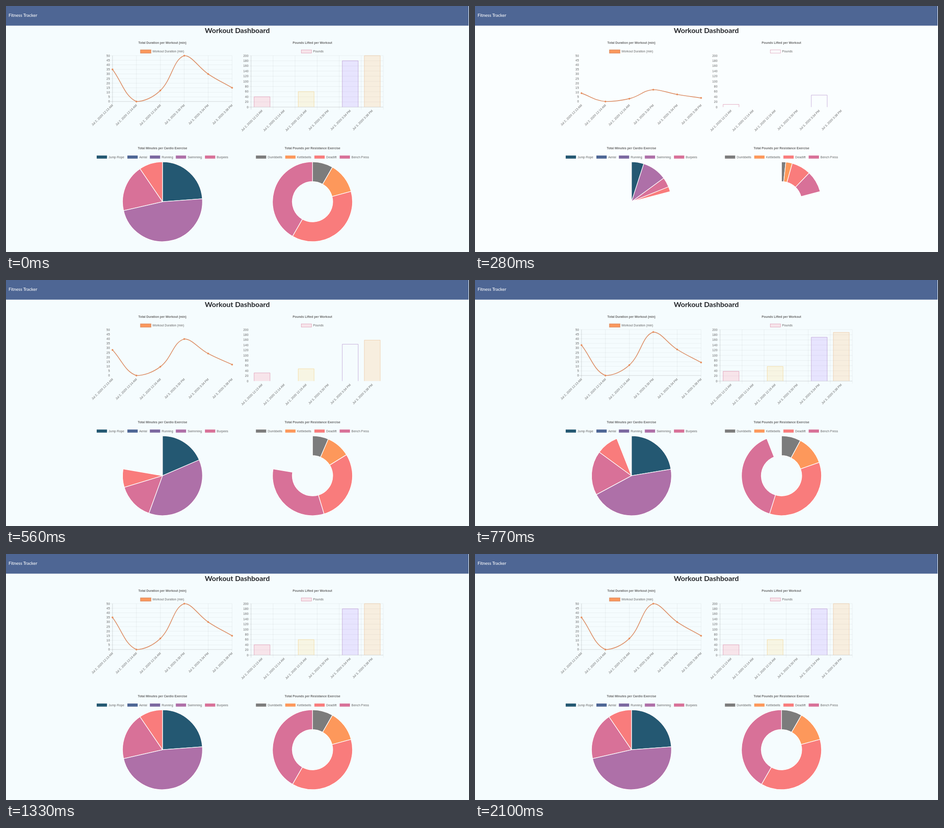
Recreate the animation shown at these times as an HTML page. Size 1026x546 px, loop 2310 ms.

```html
<!DOCTYPE html>
<html lang="en">
<head>
<meta charset="utf-8">
<title>Workout Dashboard</title>
<style>
html, body { margin: 0; width: 100%; height: 100%; overflow: hidden; background: #f5fcfe; }
svg { display: block; width: 1026px; height: 546px; }
text { font: 6.84px "Liberation Sans", Arial, sans-serif; fill: #666; }
.title { font-weight: bold; text-anchor: middle; }
.end { text-anchor: end; }
.brand { font: 500 9.7px Lato, sans-serif; fill: #fff; }
.heading { font: bold 15.96px Lato, sans-serif; fill: #24262a; text-anchor: middle; }
.grid { stroke: #000; stroke-opacity: .1; stroke-width: .57; }
.grid .axis { stroke-opacity: .27; }
.slice { stroke: #fff; stroke-width: 1.3; stroke-linejoin: bevel; }
</style>
</head>
<body>
<svg id="stage" viewBox="0 0 1026 546">
  <rect id="page" width="1026" height="546" fill="#f5fcfe"/>
  <rect width="1025" height="43.6" fill="#4e6694"/>
  <text class="brand" x="5.7" y="23.7">Fitness Tracker</text>
  <text class="heading" x="512.5" y="59.6">Workout Dashboard</text>
  <g id="charts"></g>
</svg>
<script>
const LOOP = 2310, STEP = 70;
const BLANK_FROM = 70, CHARTS_FROM = 280, TINTS_FROM = 560, GRID_FROM = 630;
const ORANGE = '#fd985b', PINK = '#d87198', CORAL = '#f97c7c';
const DATES = ['Jul 2, 2020 12:13 AM', 'Jul 2, 2020 12:14 AM', 'Jul 2, 2020 12:16 AM',
               'Jul 3, 2020 3:30 PM', 'Jul 3, 2020 3:34 PM', 'Jul 3, 2020 3:38 PM'];
const page = document.getElementById('page');
const charts = document.getElementById('charts');

function add(parent, tag, attrs = {}, content = '') {
  const node = document.createElementNS('http://www.w3.org/2000/svg', tag);
  for (const key in attrs) node.setAttribute(key, attrs[key]);
  node.textContent = content;
  parent.append(node);
  return node;
}

const label = (x, y, content, attrs = {}) =>
  add(charts, 'text', { x, y: y + 2.4, ...attrs }, content);

function legend(x, y, name, fill, stroke = 'none', width = 0) {
  label(x + 26.2, y, name);
  return add(charts, 'rect', { x, y: y - 3.42, width: 22.8, height: 6.84, fill, stroke, 'stroke-width': width });
}

function axes({ left, right, top, bottom, max, tick, ticksX, datesX }) {
  const grid = add(charts, 'g', { class: 'grid' });
  const rule = (x1, y1, x2, y2, axis) => add(grid, 'line', { x1, y1, x2, y2, class: axis ? 'axis' : '' });
  for (let v = 0; v <= max; v += tick) {
    const y = bottom - v / max * (bottom - top);
    rule(left - 5.5, y, right, y, v === 0);
    label(left - 5.8, y, v, { class: 'end' });
  }
  ticksX.forEach((x, i) => rule(x, top, x, bottom + 5.5, i === 0));
  datesX.forEach((x, i) => label(0, 0, DATES[i],
    { class: 'end', transform: `translate(${x} ${bottom + 7.2}) rotate(-45)` }));
  return grid;
}

const spread = (start, gap, count) => Array.from({ length: count }, (_, i) => start + i * gap);

// Line chart
const LINE_TOP = 110.2, LINE_BASE = 212;
const lineX = spread(236, 53, 6);
const linePoints = [35, 0, 12, 50, 30, 15].map((v, i) => [lineX[i], LINE_BASE - v / 50 * (LINE_BASE - LINE_TOP)]);
label(346.5, 82, 'Total Duration per Workout (min)', { class: 'title' });
legend(298.2, 101, 'Workout Duration (min)', ORANGE, '#e39164', 1.7);
const lineGrid = axes({ left: 236, right: 501, top: LINE_TOP, bottom: LINE_BASE, max: 50, tick: 5, ticksX: lineX, datesX: lineX });
const curve = add(charts, 'path', { fill: 'none', stroke: '#dd9069', 'stroke-width': 1.7 });
const dots = linePoints.map(([cx]) => add(charts, 'circle', { cx, r: 2, fill: '#e8905f' }));

// Spline handles, kept inside the plot area
const handles = linePoints.map((p, i) => {
  const a = linePoints[i - 1] || p, b = linePoints[i + 1] || p;
  const before = Math.hypot(p[0] - a[0], p[1] - a[1]), after = Math.hypot(b[0] - p[0], b[1] - p[1]);
  const handle = k => [p[0] + k * (b[0] - a[0]),
    Math.min(LINE_BASE, Math.max(LINE_TOP, p[1] + k * (b[1] - a[1])))];
  const k = .4 / (before + after);
  return { back: handle(-k * before), ahead: handle(k * after) };
});

function drawLine(v) {
  const rise = y => LINE_BASE + (y - LINE_BASE) * v;
  const at = ([x, y]) => `${x} ${rise(y)}`;
  curve.setAttribute('d', linePoints.map((p, i) => i
    ? `C${at(handles[i - 1].ahead)} ${at(handles[i].back)} ${at(p)}` : `M${at(p)}`).join(''));
  dots.forEach((dot, i) => dot.setAttribute('cy', rise(linePoints[i][1])));
}

// Bar chart
const BAR_BASE = 224.3, BAR_GAP = 48.85, BAR_WIDTH = 35.2;
label(679, 82, 'Pounds Lifted per Workout', { class: 'title' });
const poundsKey = legend(654.3, 101, 'Pounds', 'rgba(255,99,132,.16)', '#dc8fab', .7);
const barGrid = axes({ left: 543, right: 836, top: 110.2, bottom: BAR_BASE, max: 200, tick: 20,
  ticksX: spread(543, BAR_GAP, 7), datesX: spread(567.4, BAR_GAP, 6) });
const bars = [
  { slot: 0, pounds: 40, rgb: '255,99,132', stroke: '#dc8fab', outline: 0, tint: TINTS_FROM },
  { slot: 2, pounds: 60, rgb: '255,206,86', stroke: '#f3d48f', outline: TINTS_FROM, tint: TINTS_FROM },
  { slot: 4, pounds: 180, rgb: '153,102,255', stroke: '#b795cf', outline: 0, tint: GRID_FROM },
  { slot: 5, pounds: 200, rgb: '255,159,64', stroke: '#ecc49c', outline: TINTS_FROM, tint: TINTS_FROM }
];
for (const bar of bars) {
  bar.node = add(charts, 'path', { fill: `rgba(${bar.rgb},.16)`, stroke: bar.stroke, 'stroke-width': .75 });
}

function drawBars(v, time) {
  for (const { node, slot, pounds, outline, tint } of bars) {
    const x = 567.4 + slot * BAR_GAP - BAR_WIDTH / 2;
    node.setAttribute('d', `M${x} ${BAR_BASE}V${BAR_BASE - pounds * .5705 * v}h${BAR_WIDTH}V${BAR_BASE}`);
    node.setAttribute('fill-opacity', time >= tint ? 1 : 0);
    node.setAttribute('stroke-opacity', time >= outline ? 1 : 0);
  }
}

// Pie and doughnut
function roundChart(cx, title, titleX, entries, inner) {
  label(titleX, 316, title, { class: 'title' });
  for (const [name, color, , x] of entries) if (name) legend(x, 335.3, name, color);
  const total = entries.reduce((sum, e) => sum + e[2], 0);
  const slices = entries.filter(e => e[2]).map(([, fill, value]) =>
    ({ share: value / total, node: add(charts, 'path', { class: 'slice', fill }) }));
  const cy = 434.4, outer = 88.6;
  return v => {
    let from = 0;
    for (const { share, node } of slices) {
      const to = from + Math.min(share * v, .99999) * 2 * Math.PI;
      const at = (r, a) => `${cx + r * Math.sin(a)} ${cy - r * Math.cos(a)}`;
      const large = to - from > Math.PI ? 1 : 0;
      node.setAttribute('d', `M${at(outer, from)}A${outer} ${outer} 0 ${large} 1 ${at(outer, to)}L${at(inner, to)}` +
        (inner ? `A${inner} ${inner} 0 ${large} 0 ${at(inner, from)}Z` : 'Z'));
      from = to;
    }
  };
}

const drawPie = roundChart(346.8, 'Total Minutes per Cardio Exercise', 346.8, [
  ['Jump Rope', '#245872', 5, 201], ['Aerial', '#4d6695', 0, 269], ['Running', '#7b68a0', 0, 318.8],
  ['Swimming', '#ae70a8', 10, 376.3], ['Burpees', PINK, 4, 440.9], ['', CORAL, 2]
], 0);
const drawDoughnut = roundChart(679.2, 'Total Pounds per Resistance Exercise', 679.2, [
  ['Dumbbells', '#7c7c7c', 40, 553.8], ['Kettlebells', ORANGE, 60, 618.8],
  ['Deadlift', CORAL, 180, 683.4], ['Bench Press', PINK, 200, 739.4]
], 44.8);

const easeOutQuart = t => 1 - (1 - Math.min(1, Math.max(0, t))) ** 4;

function draw(now) {
  const time = Math.floor(now % LOOP / STEP) * STEP;
  const settled = time < BLANK_FROM;
  const progress = settled ? 2 : .2 + (time - 420) * .000915;
  const full = settled || time >= GRID_FROM;
  const clock = settled ? LOOP : time;

  charts.style.display = settled || time >= CHARTS_FROM ? '' : 'none';
  page.setAttribute('fill', clock < TINTS_FROM ? '#fafeff' : '#f5fcfe');
  lineGrid.style.display = barGrid.style.display = full ? '' : 'none';
  poundsKey.setAttribute('fill-opacity', clock >= TINTS_FROM ? 1 : 0);

  drawLine(easeOutQuart(progress));
  drawBars(easeOutQuart(progress), clock);
  drawPie(easeOutQuart(progress - .015));
  drawDoughnut(easeOutQuart(progress - .015));
}

let start;
function tick(now) {
  start ??= now;
  draw(now - start);
  requestAnimationFrame(tick);
}
draw(0);
requestAnimationFrame(tick);
</script>
</body>
</html>
```
